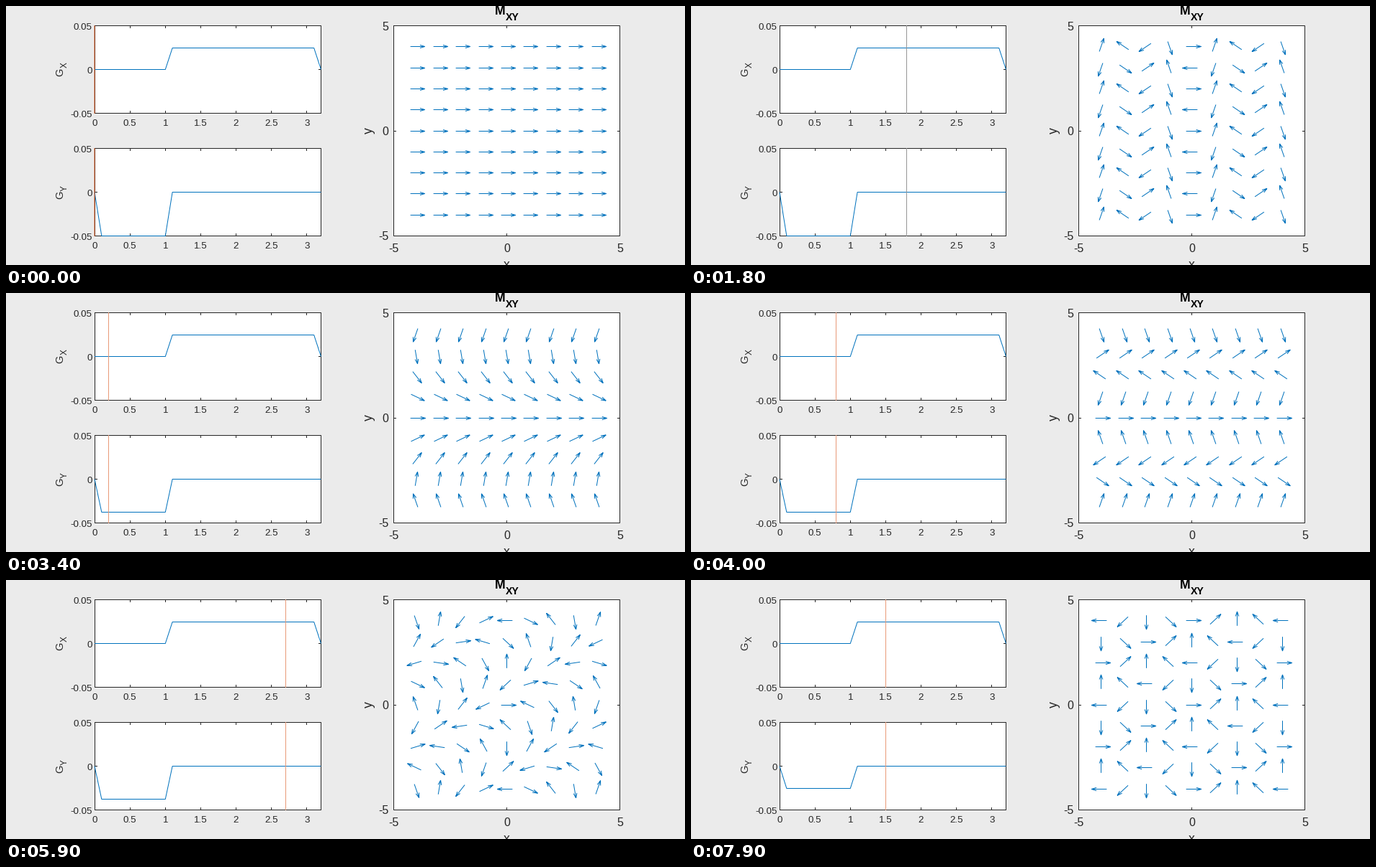
Recreate the animation shown at these times as a matplotlib script. Size 943 by 361 pixels, loop 8000 ms.

```python
import numpy as np
import matplotlib.pyplot as plt
from matplotlib.animation import FuncAnimation
from matplotlib.patches import Rectangle

W, H = 943, 361
STEPS, FRAMES = 32, 80          # steps per shot, frames per loop
DT, GAMMA = 0.1, np.deg2rad(3600)
BLUE, ORANGE, INK = "#0072BD", "#D95319", "#262626"
PALE, GRAY = "#E89A78", "#969696"

plt.rcParams["font.family"] = "Liberation Sans"
fig = plt.figure(figsize=(W / 100, H / 100), dpi=100, facecolor="#EBEBEB")
ax = fig.add_axes([0, 0, 1, 1])
ax.set_xlim(0, W)
ax.set_ylim(H, 0)
ax.axis("off")


def mid(v):
    """Centre of the pixel that holds v."""
    return np.floor(v) + 0.5


def line(x, y, color=INK, width=1.0, z=2):
    return ax.plot(x, y, color=color, lw=width * 0.72, snap=False, zorder=z,
                   solid_capstyle="butt", solid_joinstyle="miter")[0]


def label(x, y, s, px, ha="center", color=INK, rot=0, weight="normal"):
    ax.text(x, y, s, fontsize=px * 0.72, ha=ha, va="baseline", color=color,
            rotation=rot, rotation_mode="anchor", weight=weight)


def frame(l, t, r, b, xticks, yticks):
    """White plot box with inward ticks on all four sides."""
    ax.add_patch(Rectangle((l, t), r - l, b - t, fc="white", ec="none", zorder=1))
    line([l, r, r, l, l], [t, t, b, b, t])
    for x in xticks:
        line([x, x], [b, b - 3.5])
        line([x, x], [t, t + 3.5])
    for y in yticks:
        line([l, l + 3.5], [y, y])
        line([r, r - 3.5], [y, y])


# gradient plots
LEFT, RIGHT = 123.0, 437.5


def tx(t):
    return LEFT + np.asarray(t) * (RIGHT - LEFT) / 3.2


def gy_px(top, g):
    return mid(top + 61 - np.asarray(g) * 1220)


def gradient_plot(top, name):
    ticks = np.arange(0, 3.1, 0.5)
    frame(123.5, top, 437.5, top + 122, mid(tx(ticks)), [top, top + 61, top + 122])
    for t in ticks:
        label(tx(t), top + 139.5, f"{t:g}", 13.33)
    for k, s in enumerate(("0.05", "0", "-0.05")):
        label(120, top + 61 * k + 5.5, s, 13.33, ha="right")
    label(79, top + 70.5, "G", 14.67, ha="left", rot=90)
    label(85, top + 59, name, 11.7, ha="left", rot=90)


TOP_X, TOP_Y = 27.5, 198.5
gradient_plot(TOP_X, "X")
gradient_plot(TOP_Y, "Y")
line(tx([0, 1, 1.1, 3.1, 3.2]), gy_px(TOP_X, [0, 0, 0.025, 0.025, 0]), BLUE, z=3)
gy_line = line([], [], BLUE, z=3)
cursors = [line([], [], PALE, z=4) for _ in range(2)]

# magnetisation plot
CX, CY, DX, DY = 695.5, 174.0, 31.4, 29.3
frame(538.5, 27.5, 852.5, 320.5, [CX], [CY + 0.5])
for v in (-5, 0, 5):
    label(CX + v * DX, 343, str(v), 16)
    label(531.5, CY - v * DY + 6, str(v), 16, ha="right")
label(508.5, CY, "y", 17.6, rot=90)
label(CX, 365.5, "x", 17.6)
label(678.8, 12, "M", 17.6, ha="left", color="black", weight="bold")
label(693.6, 20, "XY", 14.1, ha="left", color="black", weight="bold")
arrows = line([], [], BLUE, z=3)

X, Y = (a.ravel() for a in np.meshgrid(np.arange(-4, 5), np.arange(-4, 5)))
PX, PY = mid(CX + X * DX), mid(CY - Y * DY)


def arrow_path(phase):
    c, s = np.cos(phase), np.sin(phase)
    # auto-scaled length follows the extent of the arrow tails
    span = np.hypot(np.ptp(X - 0.25 * c), np.ptp(Y - 0.25 * s))
    size = 0.45 * span / 8

    def at(along, side):
        return (PX + (along * c - side * s) * DX,
                PY - (along * s + side * c) * DY)

    tip = size - 0.25
    back, wing = tip - 0.33 * size, 0.11 * size
    gap = np.full(X.shape, np.nan)
    pts = [at(-0.25, 0), at(tip, 0), (gap, gap),
           at(back, wing), at(tip, 0), at(back, -wing), (gap, gap)]
    return (np.column_stack([p[i] for p in pts]).ravel() for i in (0, 1))


def update(i):
    shot, n = divmod(i, STEPS)
    amp = -0.05 + 0.0125 * shot
    gy_line.set_data(tx([0, 0.1, 1, 1.1, 3.2]),
                     gy_px(TOP_Y, [0, amp, amp, 0, 0]))

    x = mid(tx(n * DT)) if n else LEFT
    color = ORANGE if n == 0 else GRAY if shot == 0 else PALE
    for cur, top in zip(cursors, (TOP_X, TOP_Y)):
        cur.set_data([x, x], [top - 0.5, top + 122.5])
        cur.set_color(color)

    kx = GAMMA * DT * 0.025 * max(0, n - 10)
    ky = GAMMA * DT * amp * min(n, 10)
    arrows.set_data(*arrow_path(kx * X + ky * Y))
    return [gy_line, arrows, *cursors]


anim = FuncAnimation(fig, update, frames=FRAMES, interval=100,
                     init_func=lambda: update(0), repeat=True, repeat_delay=0)
plt.show()
```
